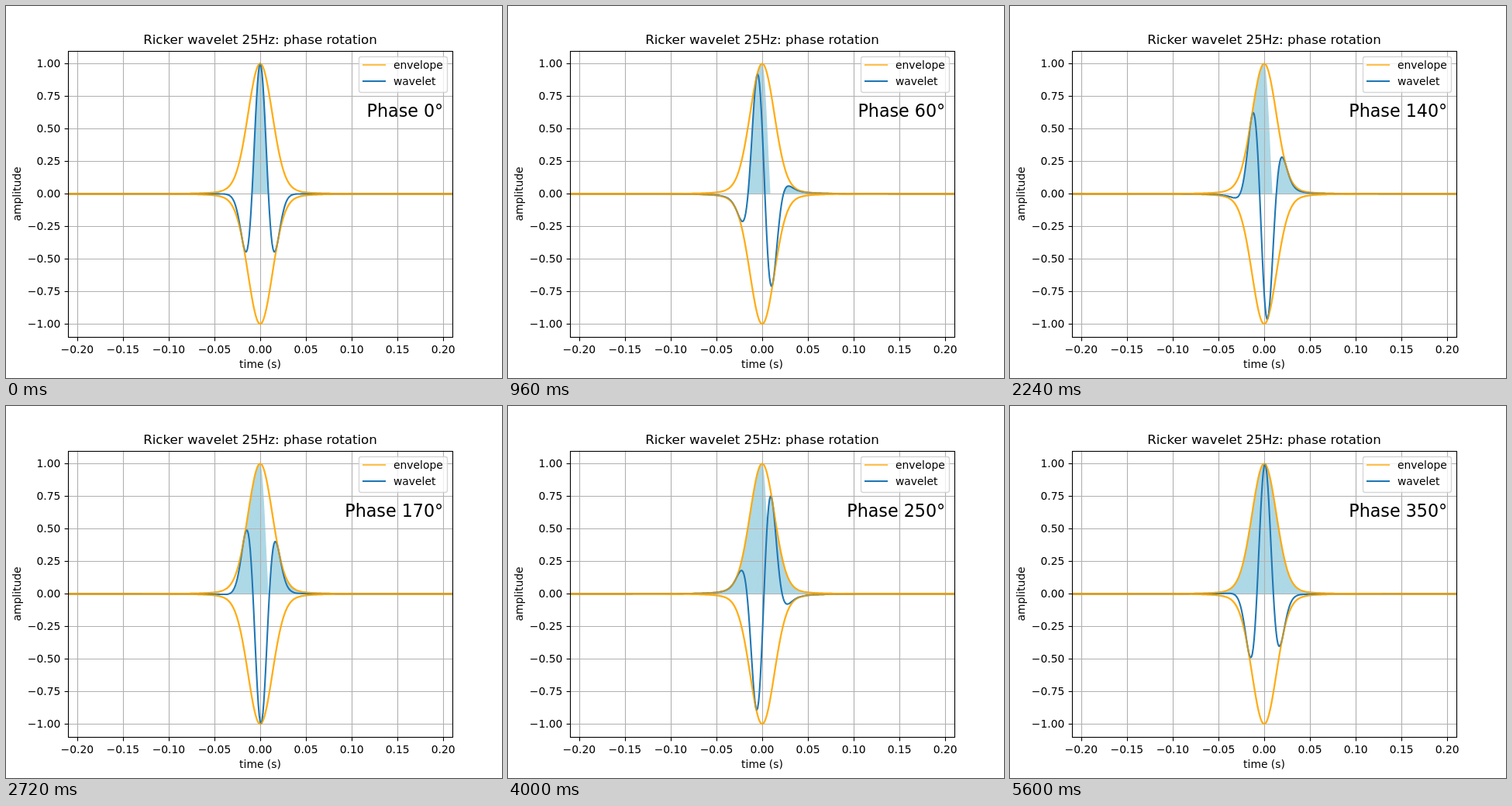
These frames come from a looping animation (640 by 480 pixels, 5.76 s). An HTML page with a canvas:

```html
<!DOCTYPE html>
<html lang="en">
<head>
<meta charset="utf-8">
<title>Wavelet phase rotation</title>
<style>
  html, body { margin: 0; width: 100%; height: 100%; overflow: hidden; background: #fff; }
  canvas { display: block; }
</style>
</head>
<body>
<canvas id="stage" width="640" height="480"></canvas>
<script>
const ctx = document.getElementById('stage').getContext('2d');
const STEP_MS = 160, STEPS = 36;
const PT = 100 / 72; // pixels per point
const LEFT = 80, RIGHT = 576, TOP = 57.6, BOTTOM = 427.2;
const ORANGE = '#ffa500', BLUE = '#1f77b4';

const px = t => 328 + t * (RIGHT - LEFT) / 0.42;
const py = a => 242.4 - a * 168;
const snap = v => Math.floor(v + 0.5) + 0.5;

// Analytic signal of the wavelet, summed over its spectrum k² exp(-k²/4)
const samples = [];
for (let i = -215; i <= 215; i++) {
  const t = i / 1000, u = Math.PI * 25 * t;
  let re = 0, im = 0, sum = 0;
  for (let k = 0.05; k < 13; k += 0.05) {
    const power = k * k * Math.exp(-k * k / 4);
    re += power * Math.cos(k * u);
    im += power * Math.sin(k * u);
    sum += power;
  }
  re /= sum;
  im /= sum;
  samples.push({ x: px(t), re, im, env: Math.hypot(re, im) });
}

const rotated = step => {
  const phase = step * Math.PI / 18;
  return s => s.re * Math.cos(phase) - s.im * Math.sin(phase);
};

function line(x1, y1, x2, y2) {
  ctx.beginPath();
  ctx.moveTo(x1, y1);
  ctx.lineTo(x2, y2);
  ctx.stroke();
}

function pen(color, points) {
  ctx.strokeStyle = color;
  ctx.lineWidth = points * PT;
}

function curve(value, color, alpha = 1) {
  pen(color, 1.5);
  ctx.globalAlpha = alpha;
  ctx.beginPath();
  for (const s of samples) ctx.lineTo(s.x, py(value(s)));
  ctx.stroke();
  ctx.globalAlpha = 1;
}

function envelope() {
  curve(s => s.env, ORANGE, 0.7);
  curve(s => -s.env, ORANGE, 0.7);
}

function fillPositive(value) {
  let run = [];
  const flush = () => {
    if (run.length > 1) {
      ctx.beginPath();
      ctx.moveTo(run[0].x, py(0));
      for (const s of run) ctx.lineTo(s.x, py(value(s)));
      ctx.lineTo(run[run.length - 1].x, py(0));
      ctx.fill();
    }
    run = [];
  };
  for (const s of samples) value(s) > 0 ? run.push(s) : flush();
  flush();
}

function text(str, x, y, points = 10, align = 'center') {
  ctx.font = `${points * PT}px "DejaVu Sans", sans-serif`;
  ctx.textAlign = align;
  ctx.fillStyle = '#000';
  ctx.fillText(str, x, y);
}

const label = v => v.toFixed(2).replace('-', '\u2212');

function eachTick(onX, onY) {
  for (let i = -4; i <= 4; i++) {
    onX(snap(px(i / 20)), i / 20);
    onY(snap(py(i / 4)), i / 4);
  }
}

function drawAxes() {
  pen('#000', 0.8);
  ctx.strokeRect(snap(LEFT), snap(TOP), RIGHT - LEFT, snap(BOTTOM) - snap(TOP));
  eachTick(
    (x, v) => { line(x, 427.5, x, 432.4); text(label(v), px(v), 448); },
    (y, v) => { line(75.6, y, 80.5, y); text(label(v), 70.3, Math.round(py(v) + 4.9), 10, 'right'); }
  );
  text('Ricker wavelet 25Hz: phase rotation', 328, 49, 12);
  text('time (s)', 328, 467);
  ctx.save();
  ctx.translate(19, 242.4);
  ctx.rotate(-Math.PI / 2);
  text('amplitude', 0, 0);
  ctx.restore();
}

function drawLegend() {
  ctx.globalAlpha = 0.8;
  ctx.beginPath();
  ctx.roundRect(455.5, 65.5, 114, 46, 2.8);
  ctx.fillStyle = '#fff';
  ctx.fill();
  pen('#ccc', 1);
  ctx.stroke();
  ctx.globalAlpha = 0.7;
  pen(ORANGE, 1.5);
  line(460, 76, 490, 76);
  ctx.globalAlpha = 1;
  pen(BLUE, 1.5);
  line(460, 97, 490, 97);
  text('envelope', 500, 81, 10, 'left');
  text('wavelet', 500, 102, 10, 'left');
}

function draw(step) {
  ctx.fillStyle = '#fff';
  ctx.fillRect(0, 0, 640, 480);

  ctx.save();
  ctx.beginPath();
  ctx.rect(LEFT, TOP, RIGHT - LEFT, BOTTOM - TOP);
  ctx.clip();
  ctx.lineJoin = 'round';
  // Shading from earlier phases stays on the plot
  ctx.fillStyle = '#add8e6';
  for (let i = 0; i <= step; i++) fillPositive(rotated(i));
  pen('#b0b0b0', 0.8);
  eachTick(x => line(x, TOP, x, BOTTOM), y => line(LEFT, y, RIGHT, y));
  envelope();
  curve(rotated(step), BLUE);
  envelope();
  ctx.restore();

  drawAxes();
  text(`Phase ${step * 10}°`, 564.2, 143, 16, 'right');
  drawLegend();
}

const start = performance.now();
let shown = -1;
function tick() {
  const step = Math.floor((performance.now() - start) / STEP_MS) % STEPS;
  if (step !== shown) draw(shown = step);
  requestAnimationFrame(tick);
}
tick();
</script>
</body>
</html>
```
